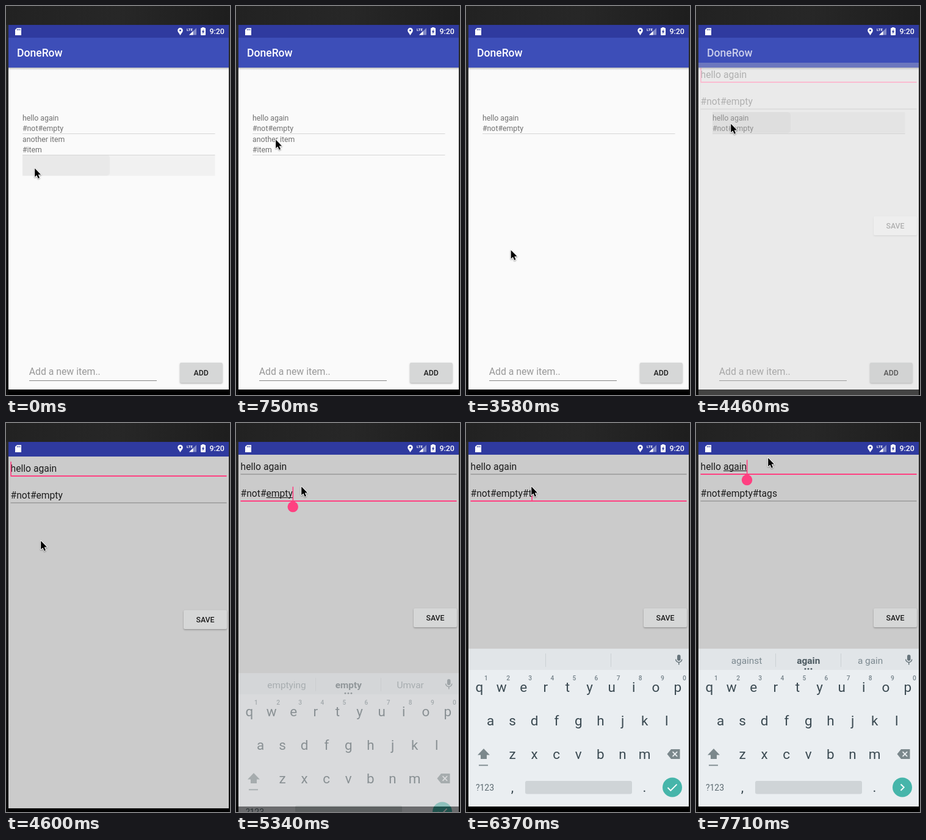
These frames come from a looping animation (367x638 px, 8 s). An HTML page with a canvas:

```html
<!DOCTYPE html>
<html lang="en">
<head>
<meta charset="utf-8">
<title>List editor</title>
<style>
html, body { margin: 0; width: 100%; height: 100%; overflow: hidden; background: #000; }
canvas { display: block; width: 367px; height: 638px; }
</style>
</head>
<body>
<canvas id="stage"></canvas>
<script>
const W = 367, H = 638, LOOP = 8000;
const BEATS = 54;
const PINK = '#ff4081', STATUS = '#2f3a9f', TOOLBAR = '#3d4eb8', SHEET = '#cbcbcb';
const INK = '#1c1c1c', KEY = '#3b4a52', KEY_ICON = '#7b888c', KEY_BG = '#eaeef1';
const FIELD_SIZE = 15.65;

const dpr = window.devicePixelRatio || 1;

function prepare(canvas) {
  canvas.width = W * dpr;
  canvas.height = H * dpr;
  return canvas.getContext('2d');
}

const layer = document.createElement('canvas');
const layerCtx = prepare(layer);
let ctx = prepare(document.getElementById('stage'));

// Moments, in beats
const DELETE = 12, OPEN = 30, TAG_FOCUS = 35, KEYS_IN = 36, HASH = 40, LETTERS = 43, TITLE_FOCUS = 49;

const touches = [
  { top: 244, from: -2.5, to: 1 },
  { top: 209, from: 10, to: 18 },
  { top: 174, from: 28, to: 31 }
];
const moves = [
  { from: 0, to: 5, x: 65, y: 219 },
  { from: 17, to: 22, x: 88, y: 583 },
  { from: 23, to: 27, x: 57, y: 193 },
  { from: 32, to: 34, x: 107, y: 104 },
  { from: 45, to: 47, x: 118, y: 57 }
];

const clamp = v => Math.min(1, Math.max(0, v));
const lerp = (a, b, p) => a + (b - a) * p;

function pointerAt(beat) {
  let x = 47, y = 266;
  for (const m of moves) {
    const p = 1 - (1 - clamp((beat - m.from) / (m.to - m.from))) ** 2.2;
    x = lerp(x, m.x, p);
    y = lerp(y, m.y, p);
  }
  return [x - .3, y];
}

function sheetAt(beat) {
  const rest = 1 - clamp((beat - OPEN) / 2);
  return { dy: 41 * rest ** 3.8, alpha: beat < OPEN ? 0 : clamp(.33 + .67 * (beat - OPEN)) };
}

function keysAt(beat) {
  const rest = 1 - clamp((beat - KEYS_IN) / 2);
  return { dy: 40 * rest ** 2.4, alpha: beat < KEYS_IN ? 0 : 1 - .55 * rest ** 3 };
}

function typedAt(beat) {
  const count = beat < HASH ? 0 : beat < LETTERS ? 1 : beat - LETTERS + 2;
  return '#tags'.slice(0, count);
}

function hintsAt(beat) {
  if (beat > TITLE_FOCUS) return ['against', 'again', 'a gain'];
  if (beat < HASH) return ['emptying', 'empty', 'Umvar'];
  const word = typedAt(beat).slice(1);
  return word.length > 2 && beat < TITLE_FOCUS ? ['taga', word, 'Tags'] : [];
}

function rect(x, y, w, h, fill) {
  ctx.fillStyle = fill;
  ctx.fillRect(x, y, w, h);
}

function rounded(x, y, w, h, r, fill) {
  ctx.fillStyle = fill;
  ctx.beginPath();
  ctx.roundRect(x, y, w, h, r);
  ctx.fill();
}

function circle(x, y, r, fill) {
  ctx.fillStyle = fill;
  ctx.beginPath();
  ctx.arc(x, y, r, 0, Math.PI * 2);
  ctx.fill();
}

function trace(points) {
  ctx.beginPath();
  points.forEach(([x, y]) => ctx.lineTo(x, y));
}

function shape(points, fill) {
  trace(points);
  ctx.fillStyle = fill;
  ctx.fill();
}

function line(points, color, width) {
  trace(points);
  ctx.strokeStyle = color;
  ctx.lineWidth = width;
  ctx.stroke();
}

function gradient(x0, y0, x1, y1, ...colors) {
  const g = ctx.createLinearGradient(x0, y0, x1, y1);
  colors.forEach((c, i) => g.addColorStop(i / (colors.length - 1), c));
  return g;
}

function text(str, x, y, size, color, weight = 400, align = 'left') {
  ctx.font = `${weight} ${size}px Roboto, sans-serif`;
  ctx.textAlign = align;
  ctx.fillStyle = color;
  ctx.fillText(str, x, y);
}

function fieldWidth(str) {
  ctx.font = `400 ${FIELD_SIZE}px Roboto, sans-serif`;
  return ctx.measureText(str).width;
}

// Paints on a separate layer, so that the whole group fades as one.
function group({ dy, alpha }, paint) {
  if (!alpha) return;
  const main = ctx;
  ctx = layerCtx;
  ctx.setTransform(dpr, 0, 0, dpr, 0, 0);
  ctx.clearRect(0, 0, W, H);
  ctx.translate(0, dy);
  paint();
  ctx = main;
  ctx.globalAlpha = alpha;
  ctx.drawImage(layer, 0, 0, W, H);
  ctx.globalAlpha = 1;
}

function button(label, x, y, w, h) {
  ctx.save();
  ctx.shadowColor = 'rgba(0,0,0,.3)';
  ctx.shadowBlur = 2.5 * dpr;
  ctx.shadowOffsetY = 1.2 * dpr;
  rounded(x, y, w, h, 2, '#d6d7d7');
  ctx.restore();
  text(label, x + w / 2, y + h / 2 + 4.4, 12.3, INK, 500, 'center');
}

function backdrop() {
  rect(0, 0, W, H, '#000');
  rect(0, 0, W, 31, gradient(0, 0, W, 31, '#222', '#272727', '#1e1e1e'));
  const side = gradient(0, 31, 0, H, '#2b2b2b', '#080808');
  rect(0, 31, 4, H, side);
  rect(365, 31, 2, H, side);
}

function statusBar(height) {
  rect(4, 31, 361, height, STATUS);
  // memory card
  shape([[18, 36], [25, 36], [25, 48], [15, 48], [15, 39]], '#fff');
  for (let i = 0; i < 3; i++) rect(18 + i * 2.2, 37.5, 1, 2.5, STATUS);
  // location pin
  circle(285.5, 40, 4.3, '#fff');
  shape([[281.6, 42], [289.4, 42], [285.5, 48]], '#fff');
  circle(285.5, 40, 1.5, STATUS);
  // signal
  shape([[312, 36], [312, 47.5], [300, 47.5]], '#8289c6');
  shape([[306.5, 41.3], [306.5, 47.5], [300, 47.5]], '#fff');
  text('LTE', 296, 40.7, 6.2, '#fff', 700);
  // battery
  rect(321, 35, 4, 2, '#fff');
  rounded(319, 36, 8, 12, 1, '#fff');
  shape([[323.7, 38], [320.8, 42.7], [322.6, 42.7], [322.2, 46], [325.2, 41.3], [323.4, 41.3]], STATUS);
  text('9:20', 333.5, 46.2, 12.4, '#fff', 500);
}

function listRow(top, title, tags) {
  text(title, 27, top + 14, 12.3, '#707070');
  text(tags, 27, top + 31, 12.3, '#707070');
  rect(27, top + 35, 315.5, 1, '#d6d6d6');
}

function ripple({ top, from, to }, beat) {
  if (beat < from || beat >= to) return;
  const age = beat - from;
  const strength = .05 * (1 - clamp(age / 4) ** 2);
  rounded(27, top, 315.5, 34.5, 1, 'rgba(0,0,0,.034)');
  rounded(27, top, 68 + 30 * age, 34.5, [0, 5, 5, 0], `rgba(0,0,0,${strength})`);
}

function listScreen(beat) {
  rect(4, 52, 361, 577, '#fafafa');
  rect(4, 52, 361, 49, TOOLBAR);
  rect(4, 101, 361, 4, gradient(0, 101, 0, 105, 'rgba(0,0,0,.25)', 'rgba(0,0,0,0)'));
  text('DoneRow', 18, 83.3, 17.56, beat < OPEN ? '#fff' : 'rgba(255,255,255,.72)', 500);

  touches.forEach(touch => ripple(touch, beat));
  listRow(174, 'hello again', '#not#empty');
  if (beat < DELETE) listRow(209, 'another item', '#item');

  text('Add a new item..', 37.7, 604.7, 15.8, '#989898');
  rect(38, 614, 209, 1, '#858585');
  button('ADD', 285, 585, 69.5, 33);
}

function field(str, baseline, focused) {
  text(str, 7.6, baseline, FIELD_SIZE, INK);
  if (focused) rect(7.5, baseline + 6, 354, 2, PINK);
  else rect(7.5, baseline + 6.5, 354, 1, '#808080');
}

function caret(before, baseline, handle) {
  const x = 8 + fieldWidth(before), y = baseline + 16.5;
  rect(x - .7, baseline - 16.5, 1.6, 23, PINK);
  if (!handle) return;
  circle(x, y, 8.7, PINK);
  shape([[x, y - 11], [x - 6.5, y - 5.5], [x + 6.5, y - 5.5]], PINK);
}

function underline(before, word, baseline) {
  rect(7.6 + fieldWidth(before), baseline + 1, fieldWidth(word), 1, INK);
}

function editScreen(beat) {
  const titleLine = 77, tagLine = 121;
  const onTags = beat >= TAG_FOCUS && beat < TITLE_FOCUS;
  const title = 'hello again', tags = '#not#empty' + typedAt(beat);
  rect(4, 52, 361, 577, SHEET);
  field(title, titleLine, !onTags);
  field(tags, tagLine, onTags);
  button('SAVE', 291, 304, 71, 31);

  if (onTags) caret(tags, tagLine, beat < HASH);
  else caret(beat < TAG_FOCUS ? '' : title, titleLine, beat >= TITLE_FOCUS);

  // the word that the keyboard is suggesting for
  const word = beat >= KEYS_IN && hintsAt(beat)[1];
  if (!word) return;
  const [str, baseline] = onTags ? [tags, tagLine] : [title, titleLine];
  underline(str.slice(0, -word.length), word, baseline);
}

function keyRow(letters, x, baseline, size = 22.5, color = KEY, weight = 400) {
  [...letters].forEach((c, i) => text(c, x + i * 36.1, baseline, size, color, weight, 'center'));
}

function mic() {
  const color = '#66747b';
  rounded(346, 380, 5.5, 10, 2.7, color);
  ctx.beginPath();
  ctx.arc(348.7, 387.5, 5, 0, Math.PI);
  ctx.strokeStyle = color;
  ctx.lineWidth = 1.5;
  ctx.stroke();
  rect(348, 392.5, 1.5, 4, color);
}

function suggestions(words) {
  rect(4, 370.5, 361, 34.5, '#e1e5e8');
  for (const x of [130, 237]) rect(x, 378, 1, 22, '#cbd1d4');
  mic();
  words.forEach((word, i) => {
    const mid = i === 1;
    text(word, 83 + i * 101.3, 395, 15.4, mid ? '#4b5960' : '#7c8990', mid ? 700 : 400, 'center');
    if (mid) for (let d = -5; d <= 5; d += 5) circle(184 + d, 403.3, 1.4, '#4b5960');
  });
}

function keyboard(beat) {
  rect(4, 370.5, 361, 258.5, KEY_BG);
  suggestions(hintsAt(beat));

  keyRow('1234567890', 33, 421.7, 10.2, '#75828a', 500);
  keyRow('qwertyuiop', 22, 441);
  keyRow('asdfghjkl', 40, 496);
  keyRow('zxcvbnm', 76, 551);

  // shift
  shape([[29, 534], [39, 544.5], [19, 544.5]], KEY_ICON);
  rect(24, 544, 10, 7, KEY_ICON);
  rect(21, 560.5, 15, 1.8, KEY_ICON);
  // backspace
  shape([[336, 535], [350.5, 535], [350.5, 551], [336, 551], [329.5, 543]], KEY_ICON);
  for (const d of [-3.8, 3.8]) line([[342.3 - d, 539.2], [342.3 + d, 546.8]], KEY_BG, 1.8);

  text('?123', 31, 602.7, 14, '#5d6b72', 400, 'center');
  text(',', 76, 605, 22.5, KEY, 400, 'center');
  rounded(97, 587, 175, 21.5, 3, '#cfd4d7');
  text('.', 292.5, 605, 22.5, KEY, 400, 'center');
  circle(338, 597.5, 16, '#46b5aa');
  const icon = beat < TITLE_FOCUS
    ? [[330.5, 598], [335.3, 602.8], [345.5, 592.6]]
    : [[335.5, 592.5], [340.7, 597.6], [335.5, 602.7]];
  line(icon, '#fff', 1.9);
}

function arrow(x, y) {
  ctx.save();
  ctx.translate(x, y);
  ctx.lineJoin = 'round';
  trace([[.5, .3], [.5, 14.3], [3.7, 11.4], [6, 16.7], [8.3, 15.7], [6, 10.6], [10.4, 10.4]]);
  ctx.closePath();
  ctx.shadowColor = 'rgba(0,0,0,.4)';
  ctx.shadowBlur = 2 * dpr;
  ctx.shadowOffsetY = dpr;
  ctx.strokeStyle = '#fff';
  ctx.lineWidth = 2;
  ctx.stroke();
  ctx.shadowColor = 'transparent';
  ctx.fillStyle = '#000';
  ctx.fill();
  ctx.restore();
}

function draw(t) {
  const beat = Math.floor(t / LOOP * BEATS);
  const sheet = sheetAt(beat);
  ctx.setTransform(dpr, 0, 0, dpr, 0, 0);
  backdrop();
  listScreen(beat);
  group(sheet, () => editScreen(beat));
  statusBar(21 + (sheet.alpha === 1 ? sheet.dy : 0));
  group(keysAt(beat), () => keyboard(beat));
  arrow(...pointerAt(beat));
}

const start = performance.now();
function tick() {
  draw((performance.now() - start) % LOOP);
  requestAnimationFrame(tick);
}
tick();
</script>
</body>
</html>
```
